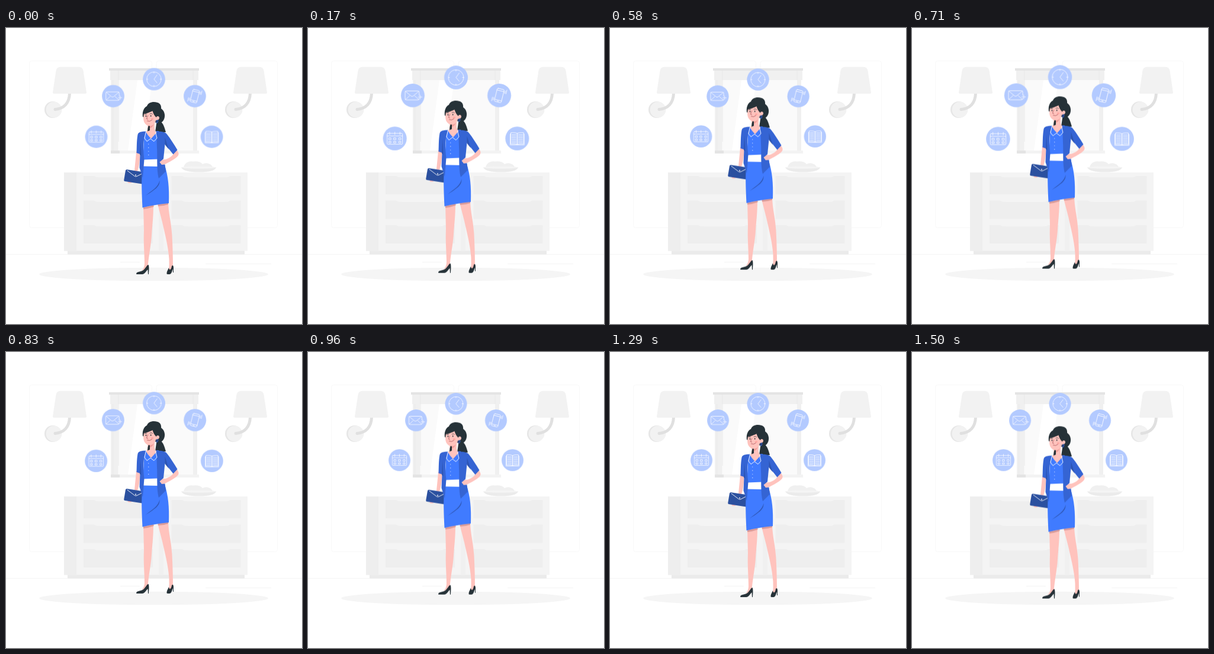
These frames come from a looping animation (500x500 px, 1540 ms). An HTML page without scripts:

```html
<!DOCTYPE html>
<html lang="en">
<head>
<meta charset="utf-8">
<title>Businesswoman with floating tasks</title>
<style>
html, body { margin: 0; width: 100%; height: 100%; overflow: hidden; background: #fff; }
svg { display: block; width: 100vw; height: 100vh; }

.bubbles, .woman { animation: 1540ms linear infinite; }
.bubbles { animation-name: heartbeat; transform-origin: 250px 135px; }
.woman { animation-name: float; }

@keyframes heartbeat {
  0%, 100% { transform: scale(1.021); }
  7.66%, 46.62% { transform: scale(1.1); }
  27.14%, 36.88%, 56.36%, 97.9% { transform: scale(1); }
}
@keyframes float {
  0%, 100% { transform: translateY(0); }
  46.62% { transform: translateY(-9.57px); }
  95.4%, 97.9% { transform: translateY(.43px); }
}

.disc { fill: #b3caff; }
.icon { fill: none; stroke: #fff; stroke-width: .75; stroke-linecap: round; stroke-linejoin: round; }
.skin { fill: #ffc3bd; }
.dark { fill: #263238; }
.blue { fill: #407bff; }
.jacket { fill: #3564d3; }
.line { fill: none; stroke-linecap: round; stroke-linejoin: round; }
</style>
</head>
<body>
<svg viewBox="0 0 500 500">
  <defs>
    <circle id="disc" class="disc" r="18.5"/>
    <g id="lamp">
      <circle cx="79" cy="138" r="14" fill="#e6e6e6"/>
      <circle cx="81" cy="138" r="13.4" fill="#f2f2f2"/>
      <path d="M83 137.5C98 136 107 127 107.500 110" fill="none" stroke="#e0e0e0" stroke-width="5" stroke-linecap="round"/>
      <path d="M79 109L84.500 72Q85.500 66 92 65.700H123Q129.500 66 130.500 72L136 109Q136 111 134 111H81Q79 111 79 109Z" fill="#f2f2f2"/>
    </g>
    <g id="drawers">
      <path id="drawer" d="M0 0H18Q20 2.500 30 2.500H88Q97 2.500 99 0H117V31H0Z" fill="#eee"/>
      <use href="#drawer" y="41.500"/>
      <use href="#drawer" y="83"/>
    </g>
  </defs>

  <g id="room">
    <g fill="none" stroke="#f7f7f7" stroke-width=".8">
      <rect x="39.500" y="55.500" width="207" height="282" rx="4"/>
      <rect x="254" y="55.500" width="204.500" height="282" rx="4"/>
    </g>
    <path d="M0 382.400H500M193 395.500H226M337 398.500H448" stroke="#efefef" stroke-width=".7"/>

    <use href="#lamp"/>
    <use href="#lamp" x="305"/>

    <rect x="177" y="72" width="146" height="140" fill="#f0f0f0"/>
    <rect x="189.500" y="80" width="126.500" height="127" fill="#fafafa"/>
    <path d="M222 88H247L231 207H206Z" fill="#fff"/>
    <path d="M190 88V192M180.500 88V207" stroke="#e8e8e8" stroke-width=".8"/>
    <rect x="176" y="72" width="149" height="16" fill="#f0f0f0"/>
    <path d="M190 72V88M316 72V88" stroke="#e6e6e6" stroke-width=".8"/>
    <rect x="174" y="68" width="152" height="4" fill="#e4e4e4"/>
    <rect x="177" y="207" width="149" height="5" fill="#f3f3f3"/>
    <rect x="177" y="207" width="15" height="5" fill="#e4e4e4"/>

    <rect x="104" y="376" width="299" height="6.500" fill="#ebebeb"/>
    <rect x="98" y="244" width="310" height="132.500" fill="#f4f4f4"/>
    <rect x="98" y="244" width="21" height="132.500" fill="#eee"/>
    <rect x="258" y="250" width="8" height="126" fill="#f0f0f0"/>
    <use href="#drawers" x="131" y="250"/>
    <use href="#drawers" x="279.500" y="250"/>

    <g fill="#f0f0f0">
      <path d="M300 237C300 230 307 224 315 225.500Q328 224 332 230Q337 227 342 229Q349 231 349 237Z"/>
      <path d="M296 235.500H355Q352 243.500 326 243.500T296 235.500Z" fill="#ebebeb"/>
      <ellipse cx="325.500" cy="235.700" rx="29.500" ry="2" fill="#f4f4f4"/>
    </g>
    <ellipse cx="249.500" cy="416" rx="193.500" ry="11.300" fill="#f5f5f5"/>
  </g>

  <g class="bubbles">
    <g transform="translate(250 87.500)">
      <use href="#disc"/>
      <g class="icon">
        <circle r="12"/>
        <path d="M5 -7L0 0L5 6M0 -12V-10M0 12V10M-12 0H-10M12 0H10"/>
      </g>
    </g>
    <g transform="translate(182.500 115.500)">
      <use href="#disc"/>
      <path class="icon" d="M10 0V-5Q10 -7 8 -7H-10Q-12 -7 -12 -5V5Q-12 7 -10 7H8Q10 7 10 5M-11.500 -6.500L-2.500 1Q-1 2 .5 1L9.500 -6.500M-11.500 6.500L-5 .5M9.500 6.500L3 .5M11.500 -.5V5.500M8.500 2.500H14.500"/>
    </g>
    <g transform="translate(317.500 115.500)">
      <use href="#disc"/>
      <g class="icon" transform="rotate(14)">
        <rect x="-5.500" y="-10.500" width="11" height="21" rx="1.500"/>
        <path d="M-5.500 -7.500H5.500M-5.500 7.500H5.500M-1 9H1M7.500 -9V-5M9.500 -11V-5M-7.500 9V5M-9.500 11V5"/>
      </g>
    </g>
    <g transform="translate(154.500 182.700)">
      <use href="#disc"/>
      <g class="icon">
        <rect x="-12" y="-8" width="24" height="17" rx="1.500"/>
        <path d="M-12 -4H12M-8 -10V-6M0 -10V-6M8 -10V-6"/>
        <path d="M-9 -1h3v3h-3zM-1.500 -1h3v3h-3zM6.500 -1h3v3h-3zM-9 4.500h3v2.500h-3zM-1.500 4.500h3v2.500h-3zM6.500 4.500h3v2.500h-3z"/>
      </g>
    </g>
    <g transform="translate(345.500 182.700)">
      <use href="#disc"/>
      <g class="icon">
        <path id="page" d="M0 -8Q-2 -9.500 -10 -9V8.500Q-2 8 0 9.500ZM-8.500 -6H-2M-8.500 -3.500H-2M-8.500 -1H-2M-8.500 1.500H-2M-8.500 4H-2M-8.500 6.500H-2"/>
        <use href="#page" transform="scale(-1 1)"/>
        <path d="M-10 -7H-11V10H11V-7H10"/>
      </g>
    </g>
  </g>

  <g class="woman">
    <g id="legs">
      <path class="skin" d="M232 299H249C249 320 247 334 246 350C245 368 241 383 239.500 405L233 408L229 410Q234 405 234 398C234 380 232 364 233 342Z"/>
      <path class="skin" d="M256 297L274 294C275 318 279 326 280.500 350C281.500 370 282 388 282 406L275 411Q276 400 275.500 390C274 368 268 346 264 328Z"/>
      <path d="M232 303L249.500 299V302Q241 305 232 306ZM256.500 298L274 295V298Q266 301 257 301Z" fill="#d99b99"/>
      <path class="dark" d="M220 415C221 411 228 412 232 409C236 406 238 400 240.500 400C242 402 241.500 409 241 416H240L239.500 408C236 411 235 415.500 230 416H221Q220 416 220 415Z"/>
      <path class="dark" d="M271.500 414C272 410 274 408 275 405C276 410 279 409 280 402Q282.500 399 283 404V413H282V407C280 411 280 415.500 276 416H273Q271 416 271.500 414Z"/>
    </g>

    <path class="skin" d="M220 209L227 210C226 224 225 234 222 242L217 241C218 230 219 222 220 209Z"/>
    <path class="skin" d="M205 258L213 260Q212 263 206 261.500Z"/>
    <path d="M204 239L230 243V263.500L201 259Q198.800 258.500 199.300 256.500L202 240.500Q202.500 239 204 239Z" fill="#2b509f"/>
    <path class="line" d="M205 241L217.500 250.500Q219 251.500 221 250.500L229 246.500" stroke="#fff" stroke-width=".9"/>
    <circle cx="219" cy="248.500" r="1" fill="#fff"/>

    <path class="blue" d="M231 232H268C274 250 276 270 275 296Q252 298 230.500 303.500C229.500 280 228 254 231 232Z"/>
    <path d="M236 283C247 274 257 269 259.500 257.500C260 267 254 272 236 283Z" fill="#3059b8"/>

    <path class="dark" d="M255 155C264 158 266 162 270 176H252Z"/>
    <path class="blue" d="M234 175L258 174L257 224H231Z"/>
    <path d="M232 222.500L257 221.500V234L232 233.500Z" fill="#fff"/>
    <path class="skin" d="M239 160L251 159V170Q252 175 255 176L245 187Q239 181 236 175Q240 174 239.500 168Z"/>
    <path d="M240 165Q247 165 250 161Q249 168 241 170Z" fill="#f0a09c"/>

    <path class="jacket" d="M236 174.500C230 175 224 175 222.500 180C220.500 191 221 202 220.500 211L226.500 213L225.500 236L231 253L233.500 222C231 204 232 188 236 174.500Z"/>
    <path d="M227.500 190L226 214L228.500 216Z" fill="#2d55b3"/>
    <path class="skin" d="M280 210L287.500 205C292 210 292.500 213 290.500 216C285 222 276 226 269 230L263 231.500L259.500 226.500L262.500 222.500L269 222C276 220 280 217 282.500 213Z"/>
    <path class="jacket" d="M254 174.500C262 175 269 175 271.500 179C278 187 284 197 289.500 206L282.500 213.500L268.500 196L266 221L259.500 226.500L263 231L268.500 230.500L270 242L258 254C254 240 256 215 255 203Z"/>
    <path d="M268.500 185V197L275 205Z" fill="#2d55b3"/>

    <path class="line" d="M236.500 175L234 186L238 191.500L244 187L250 191.500L255 186L252.500 176" stroke="#fff" stroke-width=".9"/>
    <path class="line" d="M240.800 196V220" stroke="#fff" stroke-width="1.100" stroke-dasharray=".1 6"/>

    <g id="head">
      <path class="dark" d="M231 150C230 143 232 135 238 132C240 126 248 123.500 256 126C261 127.500 262.500 132 262 136C268 140 269.500 148 267 154Q264 161 257 161L248 158Z"/>
      <path class="dark" d="M241 164Q239 169 239 174.500L243 173V165Z"/>
      <path class="skin" d="M233.500 143C231.500 151 231.500 158 235.500 162C239 166.500 247 166.500 250 162C252 160 253 157 253 156Q258 156 259 152.500C259.500 149 256 148 253.500 150.500C252 147 250 145 248 140Q241 144 233.500 143Z"/>
      <path class="dark" d="M232.500 145Q241 145 247 138Q249 147 254 151L256 143L245 133L234 137Z"/>
      <ellipse class="dark" cx="236.500" cy="148.700" rx=".8" ry="1.200"/>
      <ellipse class="dark" cx="244.700" cy="148.500" rx=".8" ry="1.200"/>
      <path class="line" d="M234 145.800Q236 144.500 237.500 145.500M243 145Q245.500 143.500 247.500 145.500" stroke="#263238" stroke-width=".7"/>
      <path class="line" d="M239.500 148Q237.500 152 237.500 153.500L239.500 154M238.500 157Q243 159 246.500 155.500" stroke="#a9535a" stroke-width=".8"/>
      <ellipse cx="247" cy="153.500" rx="2.200" ry="1.500" fill="#ffa8a4"/>
      <path class="line" d="M255.500 155.500L257 157L255.500 160.500L253.500 158Z" stroke="#3059b8" stroke-width="1.200"/>
    </g>
  </g>
</svg>
</body>
</html>
```
